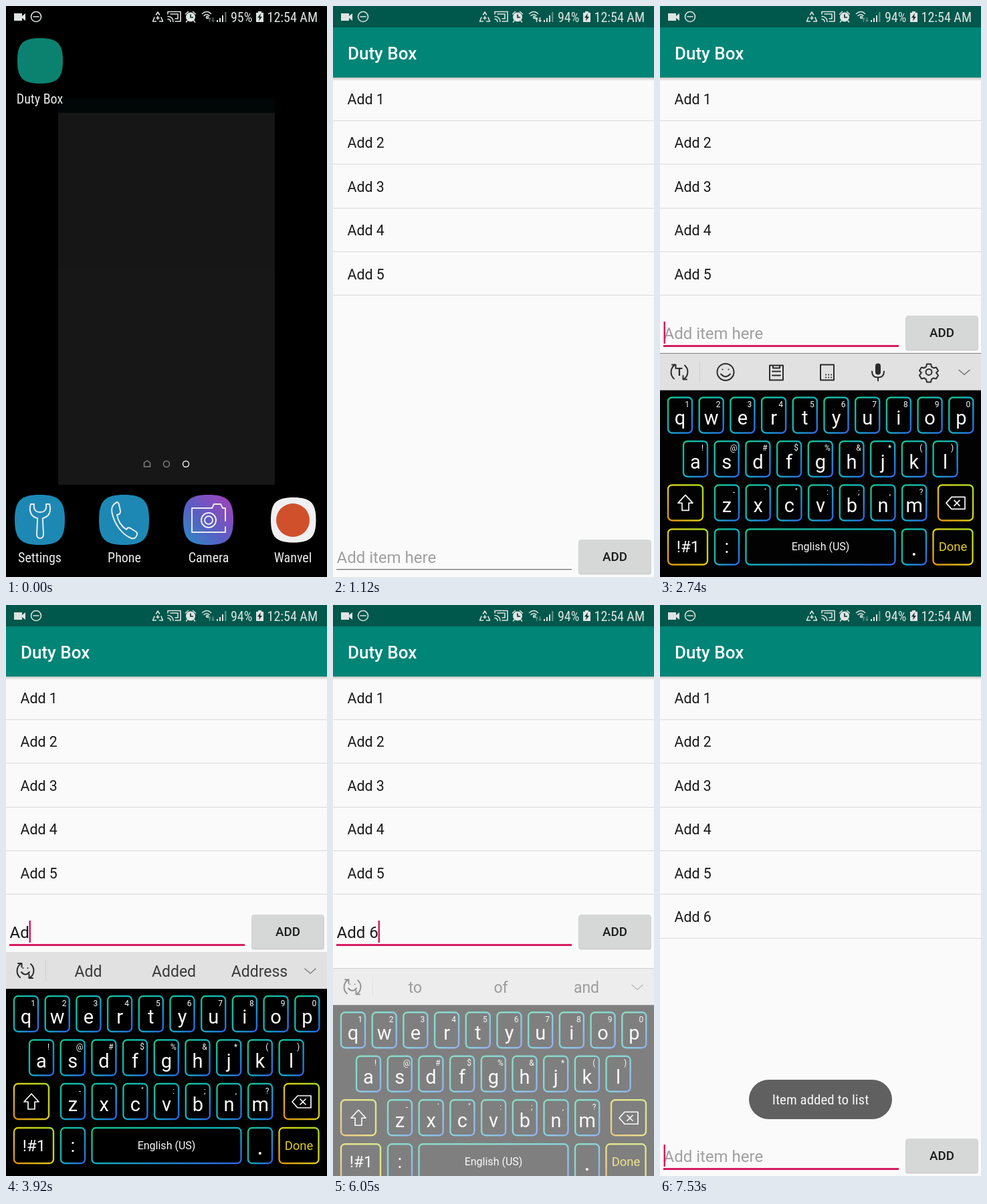
Write an HTML page without scripts that moves like this. It is 480 by 854 pixels and loops after 8 s.

```html
<!DOCTYPE html>
<html lang="en">
<head>
<meta charset="utf-8">
<title>List app</title>
<style>
html, body { margin: 0; width: 100%; height: 100%; overflow: hidden; background: #000; }
svg { display: block; width: 100%; height: 100%; }
text { font-family: Roboto, "Noto Sans", sans-serif; white-space: pre; }
.cond { font-family: "Roboto Condensed", Roboto, sans-serif; font-stretch: 75%; font-size: 20px; }
.mid { text-anchor: middle; }
.line { fill: none; stroke: currentColor; stroke-width: 2; stroke-linecap: round; stroke-linejoin: round; }
.med { font-weight: 500; }

.ease { animation: 8s linear infinite; }
.step { animation: 8s step-end infinite; }
.home, .win, .zoom { transform-origin: 240px 427px; }
.home { animation-name: home; }
.win { animation-name: win; }
.zoom { animation-name: zoom; }
.app { animation-name: app; }
.field { animation-name: field; }
.kb { animation-name: kb; }
.toast { animation-name: toast; }
.touch { animation-name: touch; }
.cursor { animation-name: cursor; }
.caps { animation-name: caps; }
.early { animation-name: early; }
.late { animation-name: late; }
.busy { animation-name: busy; }
.idle { animation-name: idle; }
.focus { animation-name: focus; }
.hint { animation-name: hint; }
.c1 { animation-name: c1; }
.c2 { animation-name: c2; }
.c3 { animation-name: c3; }
.c4 { animation-name: c4; }
.row6 { animation-name: row6; }
.tools { animation-name: tools; }
.words { animation-name: words; }
.w1 { animation-name: w1; }
.w2 { animation-name: w2; }
.w3 { animation-name: w3; }

@keyframes home {
  0%, .35% { opacity: 1; transform: scale(1); animation-timing-function: ease-out; }
  2.1% { opacity: .25; transform: scale(1.27); }
  4%, 100% { opacity: 0; transform: scale(1.3); }
}
@keyframes win { 0%, .35% { opacity: .09; } 2.2%, 100% { opacity: 1; } }
@keyframes zoom {
  0%, .35% { transform: scale(.677); animation-timing-function: cubic-bezier(.05,.9,.1,1); }
  5.88%, 100% { transform: scale(1); }
}
@keyframes app {
  0%, 10.5% { opacity: 0; animation-timing-function: ease-out; }
  14%, 100% { opacity: 1; }
}
@keyframes field { 0%, 76.25% { transform: none; } 31.75% { transform: translateY(-335px); } }
@keyframes kb {
  0%, 31.75% { opacity: 0; transform: translateY(60px); animation-timing-function: cubic-bezier(.1,.7,.3,1); }
  34.8% { opacity: 1; transform: none; }
  74.13% { opacity: 1; transform: none; animation-timing-function: ease-in; }
  75.63% { opacity: .5; transform: translateY(24px); }
  76.2%, 100% { opacity: 0; transform: translateY(44px); }
}
@keyframes toast {
  0%, 82.5% { opacity: 0; animation-timing-function: ease-out; }
  90%, 100% { opacity: 1; }
}
@keyframes touch {
  0%, 29.13%, 39.5%, 45.5%, 48.63%, 52.5%, 55.5%, 71.3%, 81.8% { visibility: hidden; }
  27.25% { visibility: visible; transform: translate(120px, 825px); }
  38% { visibility: visible; transform: translate(38px, 742px); }
  44.13% { visibility: visible; transform: translate(53px, 683px); }
  47.2%, 50.7% { visibility: visible; transform: translate(147px, 683px); }
  54.25% { visibility: visible; transform: translate(240px, 808px); }
  64.75% { visibility: visible; transform: translate(253px, 622px); }
  80.13% { visibility: visible; transform: translate(421px, 823px); }
}
@keyframes cursor {
  0%, 35.38%, 60.88%, 76.25%, 87.88% { visibility: hidden; transform: none; }
  29.13%, 41.63%, 81.63%, 94.13% { visibility: visible; transform: none; }
  44.5% { visibility: visible; transform: translateX(15px); }
  47.5% { visibility: visible; transform: translateX(29px); }
  51% { visibility: visible; transform: translateX(42px); }
  54.6%, 67.13% { visibility: visible; transform: translateX(48px); }
  70% { visibility: visible; transform: translateX(62px); }
}
@keyframes caps { 0%, 44.5% { text-transform: none; } 39% { text-transform: uppercase; } }
@keyframes early { 0% { visibility: visible; } 10.5% { visibility: hidden; } }
@keyframes late { 0% { visibility: hidden; } 10.5% { visibility: visible; } }
@keyframes busy { 0%, 23.13% { opacity: .4; } 10.5% { opacity: 1; } }
@keyframes focus { 0% { visibility: hidden; } 29.13% { visibility: visible; } }
@keyframes idle { 0% { visibility: visible; } 29.13% { visibility: hidden; } }
@keyframes hint { 0%, 81.63% { visibility: visible; } 44.5% { visibility: hidden; } }
@keyframes c1 { 0%, 81.63% { visibility: hidden; } 44.5% { visibility: visible; } }
@keyframes c2 { 0%, 81.63% { visibility: hidden; } 47.5% { visibility: visible; } }
@keyframes c3 { 0%, 81.63% { visibility: hidden; } 51% { visibility: visible; } }
@keyframes c4 { 0%, 81.63% { visibility: hidden; } 70% { visibility: visible; } }
@keyframes row6 { 0% { visibility: hidden; } 81.63% { visibility: visible; } }
@keyframes tools { 0% { visibility: visible; } 44.5% { visibility: hidden; } }
@keyframes words { 0% { visibility: hidden; } 44.5% { visibility: visible; } }
@keyframes w1 { 0%, 54.6% { visibility: hidden; } 44.5% { visibility: visible; } }
@keyframes w2 { 0%, 70% { visibility: hidden; } 54.6% { visibility: visible; } }
@keyframes w3 { 0% { visibility: hidden; } 70% { visibility: visible; } }
</style>
</head>
<body>
<svg viewBox="0 0 480 854">
  <defs>
    <linearGradient id="cool" x2="1" y2="1"><stop stop-color="#18c08c"/><stop offset=".5" stop-color="#12aebc"/><stop offset="1" stop-color="#2c64e4"/></linearGradient>
    <linearGradient id="warm" x1="1" x2="0" y2="1"><stop stop-color="#a8d820"/><stop offset=".5" stop-color="#d8cc18"/><stop offset="1" stop-color="#e09014"/></linearGradient>
    <linearGradient id="lens" x1="0" y1="1" x2="1" y2="0"><stop stop-color="#2a8cc4"/><stop offset=".45" stop-color="#5a5ec4"/><stop offset="1" stop-color="#a840b8"/></linearGradient>
    <radialGradient id="spot"><stop stop-color="#fff" stop-opacity=".85"/><stop offset=".6" stop-color="#e4e4e4" stop-opacity=".75"/><stop offset="1" stop-color="#868686" stop-opacity=".55"/></radialGradient>
    <linearGradient id="shade" x2="0" y2="1"><stop stop-opacity=".22"/><stop offset="1" stop-opacity="0"/></linearGradient>
    <path id="tile" d="M37.5 0C66 0 75 9 75 37.5S66 75 37.5 75 0 66 0 37.5 9 0 37.5 0Z"/>
    <rect id="k" width="36" height="53" rx="6" fill="none" stroke="url(#cool)" stroke-width="2.400"/>
    <g id="k7">
      <use href="#k"/><use href="#k" x="46.7"/><use href="#k" x="93.4"/><use href="#k" x="140.1"/>
      <use href="#k" x="186.8"/><use href="#k" x="233.5"/><use href="#k" x="280.2"/>
    </g>
    <path id="spin" d="M-8 10A13 13 0 0 1-6-11M-11-11h5.500v5.500M8-10A13 13 0 0 1 6 11M11 11H5.500V5.500"/>
    <path id="rule" d="M0 0H480" stroke="#dadada"/>
  </defs>

  <rect width="480" height="854"/>

  <g class="home ease" fill="#ececec" color="#ececec">
    <use href="#tile" transform="translate(17 48) scale(.907)" fill="#0b8270"/>
    <g class="mid">
      <text class="cond" x="50.500" y="146">Duty Box</text>
      <text class="cond" x="50.500" y="832">Settings</text>
      <text class="cond" x="177" y="832">Phone</text>
      <text class="cond" x="303" y="832">Camera</text>
      <text class="cond" x="429" y="832">Wanvel</text>
    </g>
    <g class="line" style="stroke-width:1.500">
      <path d="M206.500 683l4.500-3 4.500 3v6h-9z" opacity=".5"/>
      <circle cx="240" cy="685" r="4.500" opacity=".5"/>
      <circle cx="269" cy="685" r="4.500"/>
    </g>
    <use href="#tile" x="13" y="731" fill="#1e88b4"/>
    <path class="line" d="M37 745c-3 10 0 19 10 21v4l-1 20q0 6 5 6t5-6l-1-20v-4c10-2 13-11 10-21h-5c1 8-2 12-9 12s-10-4-9-12z"/>
    <use href="#tile" x="139" y="731" fill="#1e88b4"/>
    <path class="line" d="M166 742c-8 4-9 10-7 18 4 16 14 29 26 35 6 3 9 1 11-4q1-3-2-5l-8-5q-4-2-6 2c-8-5-13-14-14-22q6-1 5-6l-2-9q-1-4-3-4z"/>
    <use href="#tile" x="265" y="731" fill="url(#lens)"/>
    <g class="line">
      <path d="M328 779v8H278v-36h30l3-6h10l3 6h4v19"/>
      <circle cx="303" cy="769" r="11"/><circle cx="303" cy="769" r="6"/>
    </g>
    <use href="#tile" transform="translate(396 735) scale(.9)" fill="#f0f0f0"/>
    <circle cx="429" cy="769" r="25" fill="#d0502c"/>
  </g>

  <g class="win ease">
    <g class="zoom ease">
      <rect width="480" height="854" fill="#fafafa"/>
      <rect width="480" height="32" fill="#00574b"/>
    </g>
  </g>

  <g class="app ease">
    <rect y="32" width="480" height="822" fill="#fafafa"/>
    <rect y="32" width="480" height="75" fill="#008577"/>
    <rect y="107" width="480" height="5" fill="url(#shade)"/>
    <text class="med" x="22" y="80" font-size="26" fill="#fff">Duty Box</text>
    <use href="#rule" y="171.500"/><use href="#rule" y="236.500"/><use href="#rule" y="302.500"/>
    <use href="#rule" y="367.500"/><use href="#rule" y="432.500"/>
    <g font-size="21.300" fill="#1a1a1a">
      <text x="21.500" y="147">Add 1</text>
      <text x="21.500" y="212">Add 2</text>
      <text x="21.500" y="278">Add 3</text>
      <text x="21.500" y="343">Add 4</text>
      <text x="21.500" y="409">Add 5</text>
      <g class="row6 step"><text x="21.500" y="474">Add 6</text><use href="#rule" y="498.500"/></g>
    </g>

    <g class="field step">
      <text class="hint step" x="5.500" y="833" font-size="24" fill="#a0a0a0">Add item here</text>
      <text x="5.500" y="833" font-size="24" fill="#1a1a1a"><tspan class="c1 step">A</tspan><tspan class="c2 step">d</tspan><tspan class="c3 step">d</tspan><tspan class="c4 step"> 6</tspan></text>
      <rect class="idle step" x="5" y="842" width="352" height="1.300" fill="#757575"/>
      <rect class="focus step" x="5" y="842" width="352" height="3" fill="#d81b60"/>
      <rect class="cursor step" x="5.500" y="807" width="2.500" height="33" fill="#d81b60"/>
      <rect x="367" y="799" width="109" height="51.500" rx="4" opacity=".16"/>
      <rect x="368" y="798" width="107" height="50" rx="3" fill="#d6d7d7"/>
      <text class="med mid" x="421.500" y="829.500" font-size="18.700" fill="#1a1a1a">ADD</text>
    </g>
  </g>

  <g class="kb ease">
    <rect y="574" width="480" height="340"/>
    <rect y="519" width="480" height="55" fill="#e1e1e1"/>
    <g color="#2a2a2a" fill="#2a2a2a">
      <path d="M59.500 531v32" stroke="#cdcdcd"/>
      <path class="line" d="M447 544l8 7 8-7" style="stroke-width:1.500" opacity=".55"/>
      <use href="#spin" class="line" transform="translate(29 547)"/>
      <g class="tools step">
        <text class="mid" x="29" y="553" font-size="16" font-weight="700">T</text>
        <g class="line">
          <circle cx="98" cy="547" r="12.500"/><path d="M91 550q7 8 14 0M93.500 543v.1M102.500 543v.1"/>
          <path d="M164 537h20v22h-20zM169 537v4h10v-4M168 546h12M168 552h12"/>
          <path d="M240 536h20v23h-20z"/>
          <path d="M248 551h9M248 555h9" stroke-dasharray=".1 4"/>
          <path d="M317 546q0 9 9 9t9-9M326 555v5"/>
          <circle cx="402" cy="547" r="4.500"/>
          <path d="M399 535h6l1 4 3 2 4-1 3 5-3 3 3 4-3 5-4-1-3 2-1 4h-6l-1-4-3-2-4 1-3-5 3-4-3-3 3-5 4 1 3-2z"/>
        </g>
        <rect x="322" y="534" width="8" height="17" rx="4"/>
      </g>
      <path class="line words step" d="M23 549q6 7 12 0M25.500 543v.1M32.500 543v.1"/>
      <g class="mid" font-size="23" fill="#3a3a3a">
        <g class="w1 step"><text x="123" y="556">Add</text><text x="251" y="556">Added</text><text x="379" y="556">Address</text></g>
        <g class="w2 step"><text x="123" y="556">the</text><text x="251" y="556">a</text><text x="379" y="556">to</text></g>
        <g class="w3 step"><text x="123" y="556">to</text><text x="251" y="556">of</text><text x="379" y="556">and</text></g>
      </g>
    </g>

    <use href="#k7" x="12" y="585"/><use href="#k" x="338.900" y="585"/><use href="#k" x="385.600" y="585"/><use href="#k" x="432.300" y="585"/>
    <use href="#k7" x="35" y="650.500"/><use href="#k" x="361.900" y="650.500"/><use href="#k" x="408.600" y="650.500"/>
    <use href="#k7" x="82" y="716"/>
    <use href="#k" x="82" y="782"/><use href="#k" x="362" y="782"/>
    <rect x="128.500" y="782" width="223" height="53" rx="6" fill="none" stroke="url(#cool)" stroke-width="2.400"/>
    <g fill="none" stroke="url(#warm)" stroke-width="2.400">
      <rect x="12" y="716" width="52" height="53" rx="6"/>
      <rect x="416" y="716" width="52" height="53" rx="6"/>
      <rect x="12" y="782" width="59" height="53" rx="6"/>
      <rect x="408.500" y="782" width="59" height="53" rx="6"/>
    </g>
    <g class="mid" fill="#fafafa">
      <g class="caps step" font-size="29">
        <text y="626" x="30 76.700 123.400 170.100 216.800 263.500 310.200 356.900 403.600 450.300">qwertyuiop</text>
        <text y="692" x="53 99.700 146.400 193.100 239.800 286.500 333.200 379.900 426.600">asdfghjkl</text>
        <text y="757" x="100 146.700 193.400 240.100 286.800 333.500 380.200">zxcvbnm</text>
      </g>
      <g font-size="12" transform="translate(10.500)">
        <text y="600" x="30 76.700 123.400 170.100 216.800 263.500 310.200 356.900 403.600 450.300">1234567890</text>
        <text y="665" x="53 99.700 146.400 193.100 239.800 286.500 333.200 379.900 426.600">!@#$%&amp;*()</text>
        <text y="731" x="100 146.700 193.400 240.100 286.800 333.500 380.200">-'":;,?</text>
      </g>
      <text x="42" y="817" font-size="24">!#1</text>
      <text x="100" y="818" font-size="28">:</text>
      <text x="380" y="822" font-size="36">.</text>
      <text x="240" y="814" font-size="16">English (US)</text>
      <text x="438" y="815" font-size="18.500" fill="#e4cc20">Done</text>
    </g>
    <g class="line" color="#fafafa" style="stroke-width:1.700">
      <path d="M38 731l11 12h-6v11h-10v-11h-6z"/>
      <path d="M428 743l8-9h20v18h-20zM440 739l8 8M448 739l-8 8"/>
    </g>
  </g>

  <g class="toast ease">
    <rect x="133" y="710" width="214" height="59" rx="29.500" fill="#606060"/>
    <text class="cond mid" x="240" y="747" style="font-size:21px" fill="#f5f5f5">Item added to list</text>
  </g>

  <g fill="#dfe4e3" color="#dfe4e3">
    <path d="M12 11h12v4l5-4v11l-5-4v4H12z"/>
    <g class="line" style="stroke-width:1.600">
      <circle cx="45" cy="16" r="7.500"/><path d="M41 16h8"/>
      <path d="M224.500 13l2.500-4 2.500 4M232 17l2.500 6h-5M224.500 23h-5l2.500-6M227 15.500v4.500M225 18h4"/>
      <path d="M242 12V8.500h19V23h-8M242 15.500q7.500.5 8 8M242 19.500q4 .5 4 4M246 12h11v7h-4"/>
      <path d="M268.500 12l4-3.500M283.500 12l-4-3.500M271 22l-1.500 2M281 22l1.500 2"/>
      <path d="M293.500 11.500q7-6 13 0M296 14.500q4-3.500 8 0"/>
      <circle cx="301" cy="17" r="1.500"/>
    </g>
    <circle cx="276" cy="16.500" r="7"/>
    <path d="M276 12.500v4.500h4" fill="none" stroke="#0c2c28" stroke-width="1.600"/>
    <path class="busy step" d="M302 20l2.500-3.500 2.500 3.500h-1.700v4h-1.600v-4zM307 21l2.500 3.500 2.500-3.500h-1.700v-4h-1.600v4z"/>
    <path d="M315 21h2v3h-2zM319 18h2v6h-2zM323 14h2v10h-2z"/>
    <path d="M327 9h2.500v15H327z" opacity=".4"/>
    <path d="M377 8h5v2h3v14h-11V10h3z"/>
    <path d="M381 11l-5 6.500h3l-1 5 5-6.500h-3z" fill="#0c2c28"/>
    <text class="cond early step" x="336" y="23.500">95%</text>
    <text class="cond late step" x="336" y="23.500">94%</text>
    <text class="cond" x="466" y="23.500" text-anchor="end">12:54 AM</text>
  </g>

  <circle class="touch step" r="14.500" fill="url(#spot)"/>
</svg>
</body>
</html>
```
